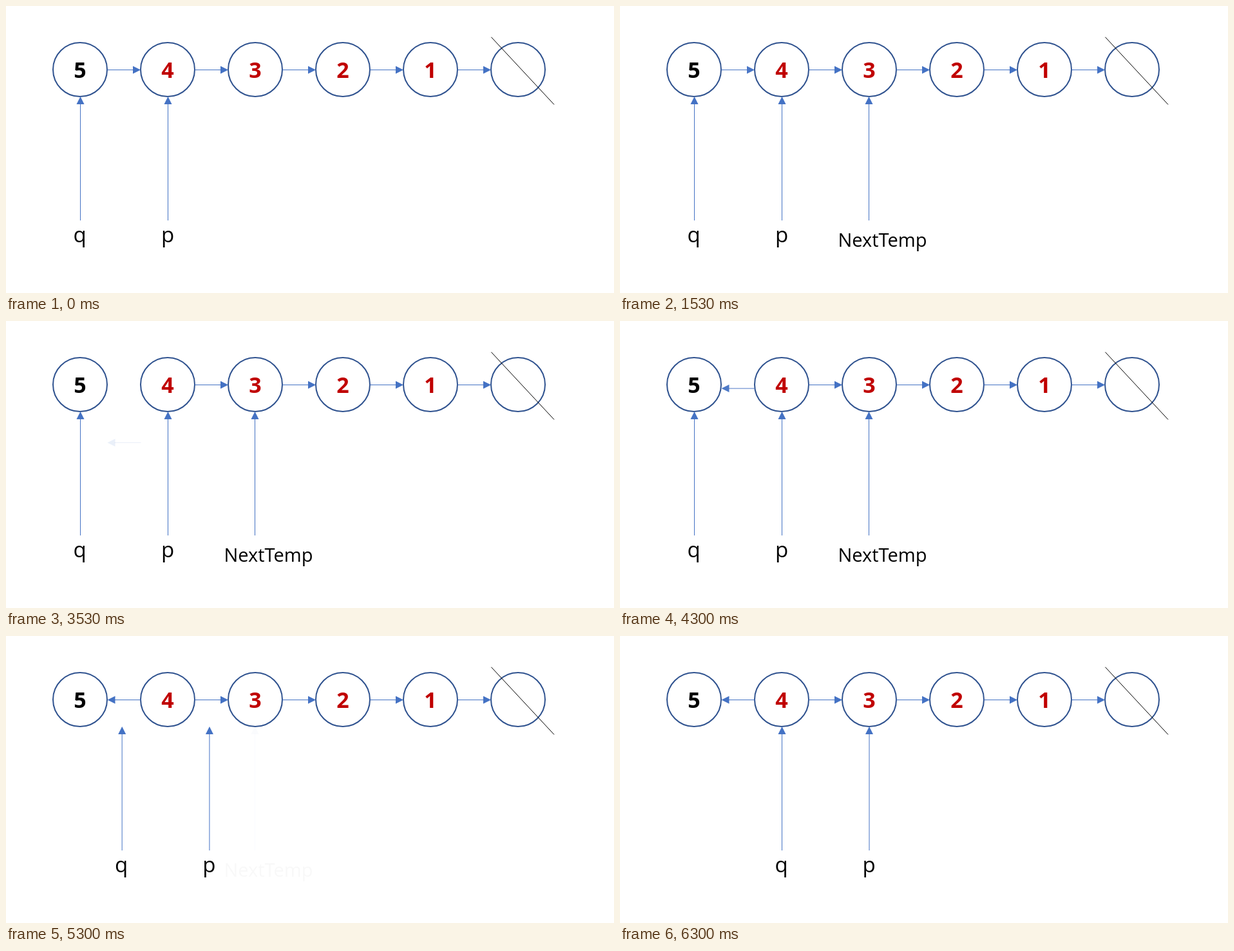
Animation, 944 px wide and 447 px high, one loop 7.39 s. Source, as an HTML page with a canvas:

```html
<!DOCTYPE html>
<html lang="en">
<head>
<meta charset="utf-8">
<title>Linked list reversal</title>
<style>
  html, body { margin: 0; width: 100%; height: 100%; overflow: hidden; background: #fff; }
  canvas { display: block; }
</style>
</head>
<body>
<canvas id="stage" width="944" height="447"></canvas>
<script>
const ctx = document.getElementById('stage').getContext('2d');
const LOOP = 7390, TICK = 1000 / 13, FIRST_TICK = 530;
const BLUE = '#4472c4', OUTLINE = '#2f528f', RED = '#c00000';
const ROW = 99, SPACING = 136, FIRST_X = 115;
const SANS = '"Open Sans", "Noto Sans", sans-serif';

const clamp = v => Math.min(1, Math.max(0, v));
const progress = (t, start, duration) => clamp((t - start) / duration);
const nodeX = i => FIRST_X + i * SPACING;

function easeInOut(u) {
  const half = v => 0.5 * Math.pow(2 * v, 2.2);
  return u < 0.5 ? half(u) : 1 - half(1 - u);
}

function line(x1, y1, x2, y2, color) {
  ctx.strokeStyle = color;
  ctx.lineWidth = 1;
  ctx.beginPath();
  ctx.moveTo(x1, y1);
  ctx.lineTo(x2, y2);
  ctx.stroke();
}

// Arrow along the given angle, with its tip at (x, y).
function arrow(x, y, length, angle, alpha = 1) {
  if (alpha <= 0) return;
  ctx.save();
  ctx.globalAlpha = alpha;
  ctx.translate(x, y);
  ctx.rotate(angle);
  line(-length, 0, -11, 0, BLUE);
  ctx.fillStyle = BLUE;
  ctx.beginPath();
  ctx.moveTo(0, 0);
  ctx.lineTo(-12, -6);
  ctx.lineTo(-12, 6);
  ctx.fill();
  ctx.restore();
}

function text(str, x, y, font, color, alpha = 1) {
  ctx.globalAlpha = alpha;
  ctx.font = `${font} ${SANS}`;
  ctx.fillStyle = color;
  ctx.textAlign = 'center';
  ctx.fillText(str, x, y);
  ctx.globalAlpha = 1;
}

function node(i, label) {
  ctx.strokeStyle = OUTLINE;
  ctx.lineWidth = 2;
  ctx.beginPath();
  ctx.arc(nodeX(i), ROW, 42, 0, Math.PI * 2);
  ctx.stroke();
  text(label, nodeX(i), 112, 'bold 34px', i ? RED : '#000');
}

function pointer(label, x, labelX, labelY, size, alpha = 1) {
  if (alpha <= 0) return;
  arrow(x, 141, 193, -Math.PI / 2, alpha);
  text(label, labelX, labelY, `${size}px`, '#000', alpha);
}

// The first link fades in coarse steps.
function firstLinkAlpha(t) {
  if (t < 1530) return 1;
  if (t < 1755) return 0.97;
  return 1 - clamp(Math.floor((t - 1445) / 230) / 8);
}

function draw(now) {
  const t = now % LOOP;
  const tick = FIRST_TICK + Math.floor((t - FIRST_TICK + 8) / TICK) * TICK;

  ctx.fillStyle = '#fff';
  ctx.fillRect(0, 0, 944, 447);

  ['5', '4', '3', '2', '1', ''].forEach((label, i) => node(i, label));
  line(753.5, 48.5, 851, 153.5, '#000');

  for (let i = 0; i < 5; i++) {
    arrow(nodeX(i) + 94, ROW + 0.5, 52, 0, i ? 1 : firstLinkAlpha(t));
  }

  const rise = progress(tick, 3430, 920);
  arrow(157.5, 200.5 - 101 * rise, 52, Math.PI, rise);

  const move = easeInOut(progress(tick, 4400, 1840));
  const qX = 115.5 + 136 * move;
  const pX = 251.5 + 135.5 * move;
  pointer('q', qX, qX - 1, 367.5, 33);
  pointer('p', pX, pX - 0.5, 367.5, 33);

  const tempAlpha = progress(tick, 453, 920) - progress(tick, 4404, 920);
  pointer('NextTemp', 386.5, 407.5, 374.5, 29, tempAlpha);
}

const start = performance.now();
function loop() {
  draw(performance.now() - start);
  requestAnimationFrame(loop);
}
loop();
</script>
</body>
</html>
```
